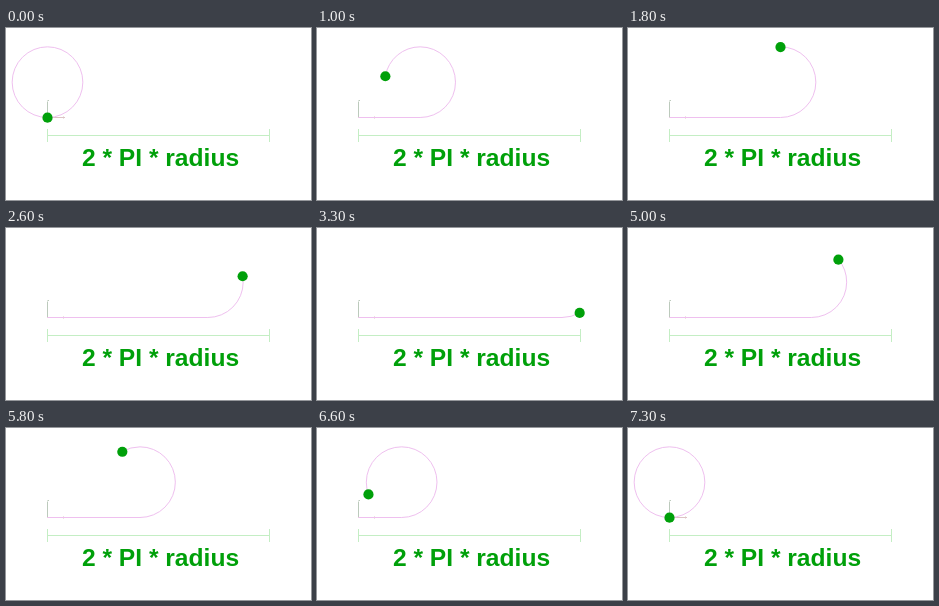
These frames come from a looping animation (305x172 px, 7.4 s). An HTML page with a canvas:

```html
<!DOCTYPE html>
<html lang="en">
<head>
<meta charset="utf-8">
<title>Unrolling circle</title>
<style>
  html, body { margin: 0; width: 100%; height: 100%; overflow: hidden; background: #fff; }
  canvas { display: block; }
</style>
</head>
<body>
<canvas id="stage" width="305" height="172"></canvas>
<script>
const ctx = document.getElementById('stage').getContext('2d');
const TAU = Math.PI * 2;
const STEP = 100, STEPS = 36, FRAMES = 74;
const X0 = 41.5, Y0 = 89.5, R = 222 / TAU;
const GREEN = '#00a00a';

function line(color, ...pts) {
  ctx.strokeStyle = color;
  ctx.beginPath();
  for (let i = 0; i < pts.length; i += 2) ctx.lineTo(pts[i], pts[i + 1]);
  ctx.stroke();
}

// Rolled fraction: out, one frame of rest, back.
function rolled(ms) {
  const n = Math.floor(ms / STEP) % FRAMES;
  return Math.max(0, n <= STEPS ? n : FRAMES - 1 - n) / STEPS;
}

function drawAxes() {
  const up = '#bccabc', across = '#dcc4c4';
  line(up, X0, Y0, X0, 73.5);
  line(up, X0, 72.5, 43, 72.5);
  line(across, X0, Y0, 59, Y0);
  line(across, 57.5, 88.5, 57.5, 90.5);
}

function drawMeasure() {
  const c = '#c4eec4', end = X0 + 222;
  line(c, X0, 107.5, end, 107.5);
  line(c, X0, 101, X0, 114);
  line(c, end, 101, end, 114);
  ctx.fillStyle = GREEN;
  ctx.font = 'bold 24.6px "Liberation Sans", Arial, sans-serif';
  ctx.textAlign = 'center';
  ctx.fillText('2 * PI * radius', 154.5, 138);
}

function drawCurve(k) {
  const a = k * TAU, cx = X0 + R * a, cy = Y0 - R;
  const down = Math.PI / 2;
  ctx.strokeStyle = '#efc0ef';
  ctx.beginPath();
  ctx.moveTo(X0, Y0);
  ctx.lineTo(cx, Y0);
  if (k < 1) ctx.arc(cx, cy, R, down, down + a - TAU, true);
  ctx.stroke();

  ctx.fillStyle = GREEN;
  ctx.beginPath();
  ctx.arc(cx - R * Math.sin(a), cy + R * Math.cos(a) + 0.2, 5.1, 0, TAU);
  ctx.fill();
}

function draw(ms) {
  ctx.fillStyle = '#fff';
  ctx.fillRect(0, 0, 305, 172);
  ctx.lineWidth = 1;
  drawAxes();
  drawMeasure();
  drawCurve(rolled(ms));
}

const start = performance.now();
function tick() {
  draw(performance.now() - start);
  requestAnimationFrame(tick);
}
tick();
</script>
</body>
</html>
```
